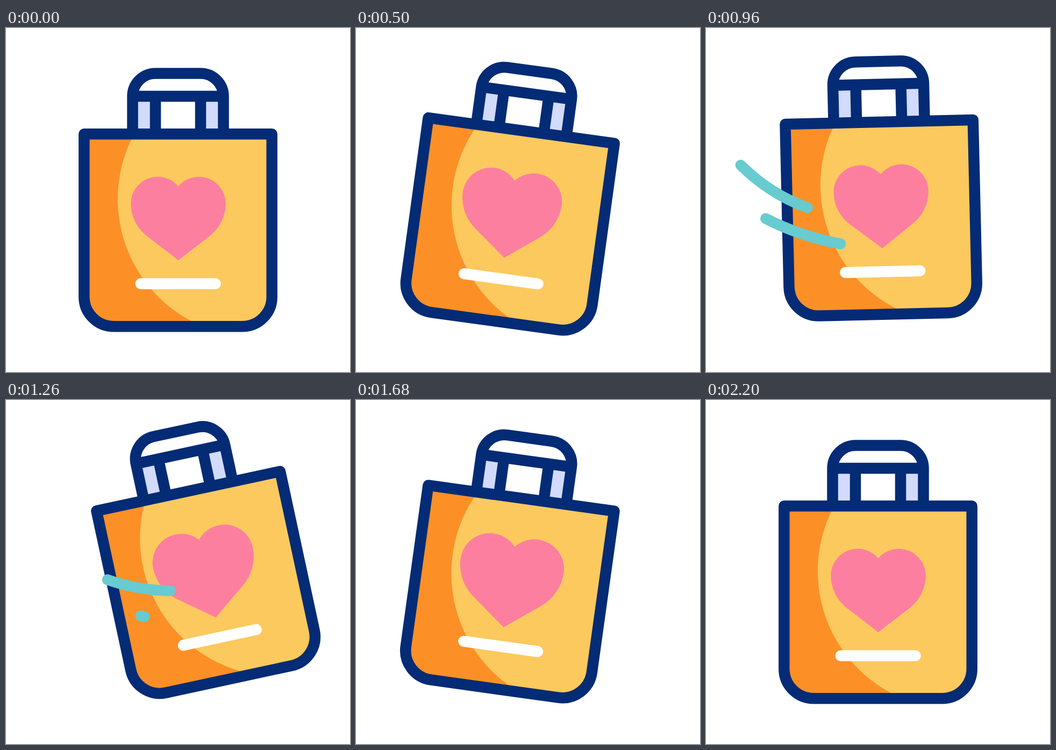
An HTML page that plays this animation: 640 px wide and 640 px high, repeating every 2400 ms.

```html
<!DOCTYPE html>
<html lang="en">
<head>
<meta charset="utf-8">
<title>Swinging shopping bag</title>
<style>
  html, body { margin: 0; width: 100%; height: 100%; overflow: hidden; background: #fff; }
  svg { display: block; width: 100vw; height: 100vh; }
  .line { fill: none; stroke: #042b75; stroke-width: 20.5; stroke-linejoin: round; }
  .streak { fill: none; stroke: #67cbd0; stroke-width: 20; stroke-linecap: round; }
</style>
</head>
<body>
<svg viewBox="0 0 640 640">
  <g id="bag">
    <path fill="#d2dbfb" d="M236 127H278V197H236zM362 127H404V197H362z"/>
    <path class="line" d="M235.5 197V127A42.5 42.5 0 0 1 278 84.5H362A42.5 42.5 0 0 1 404.5 127V197"/>
    <path class="line" d="M235.5 127H404.5M278 127V197M362 127V197"/>
    <path fill="#fc9026" d="M145 197H495V500A55 55 0 0 1 440 555H200A55 55 0 0 1 145 500z"/>
    <path fill="#fcc95e" d="M238.3 197A257 257 0 0 0 365 555H440A55 55 0 0 0 495 500V197z"/>
    <path class="line" d="M145.3 197.3H494.7V500A55 55 0 0 1 439.7 555.2H200.3A55 55 0 0 1 145.3 500z"/>
    <path id="heart" fill="#fd7f9f" d="M320.5 294.5A50 50 0 0 0 232.3 327A77 77 0 0 0 262 387L320.5 432L379 387A77 77 0 0 0 408.7 327A50 50 0 0 0 320.5 294.5z"/>
    <path stroke="#fff" stroke-width="20.5" stroke-linecap="round" d="M250.7 475.7H389.5"/>
  </g>
  <path id="upper" class="streak" pathLength="1" d="M64.5 255Q162 352 306 355"/>
  <path id="lower" class="streak" pathLength="1" d="M111 354.5Q178 389 257.5 403"/>
</svg>
<script>
const LOOP = 2400;
const el = id => document.getElementById(id);
const bag = el('bag'), heart = el('heart'), upper = el('upper'), lower = el('lower');

// Keys are [time, value] pairs, eased in and out between neighbours.
const ANGLE = [[200, 0], [700, 12], [1200, -13], [1700, 8], [2200, 0]];
const LIFT = [[200, 0], [1200, -26], [2200, 0]];
const BEAT = [[200, 1], [700, 1.08], [950, 1], [1200, 1.087], [1450, 1], [1700, 1.1], [2200, 1]];

function track(keys, t) {
  if (t <= keys[0][0]) return keys[0][1];
  for (let i = 1; i < keys.length; i++) {
    const [t0, a] = keys[i - 1], [t1, b] = keys[i];
    if (t < t1) {
      const u = (t - t0) / (t1 - t0);
      return a + (b - a) * u * u * (3 - 2 * u);
    }
  }
  return keys[keys.length - 1][1];
}

// The streak grows for 300 ms, then its tail catches up.
function trim(path, begin, t) {
  const head = track([[begin, 0], [begin + 300, 1]], t);
  const tail = track([[begin + 300, 0], [begin + 600, 1]], t);
  path.style.display = head > tail ? '' : 'none';
  path.setAttribute('stroke-dasharray', `${head - tail} 2`);
  path.setAttribute('stroke-dashoffset', -tail);
}

function draw(t) {
  bag.setAttribute('transform', `translate(0 ${track(LIFT, t)}) rotate(${track(ANGLE, t)} 320 106)`);
  heart.setAttribute('transform', `translate(320.5 354) scale(${track(BEAT, t)}) translate(-320.5 -354)`);
  trim(lower, 700, t);
  trim(upper, 800, t);
}

const start = performance.now();
function tick() {
  draw((performance.now() - start) % LOOP);
  requestAnimationFrame(tick);
}
tick();
</script>
</body>
</html>
```
